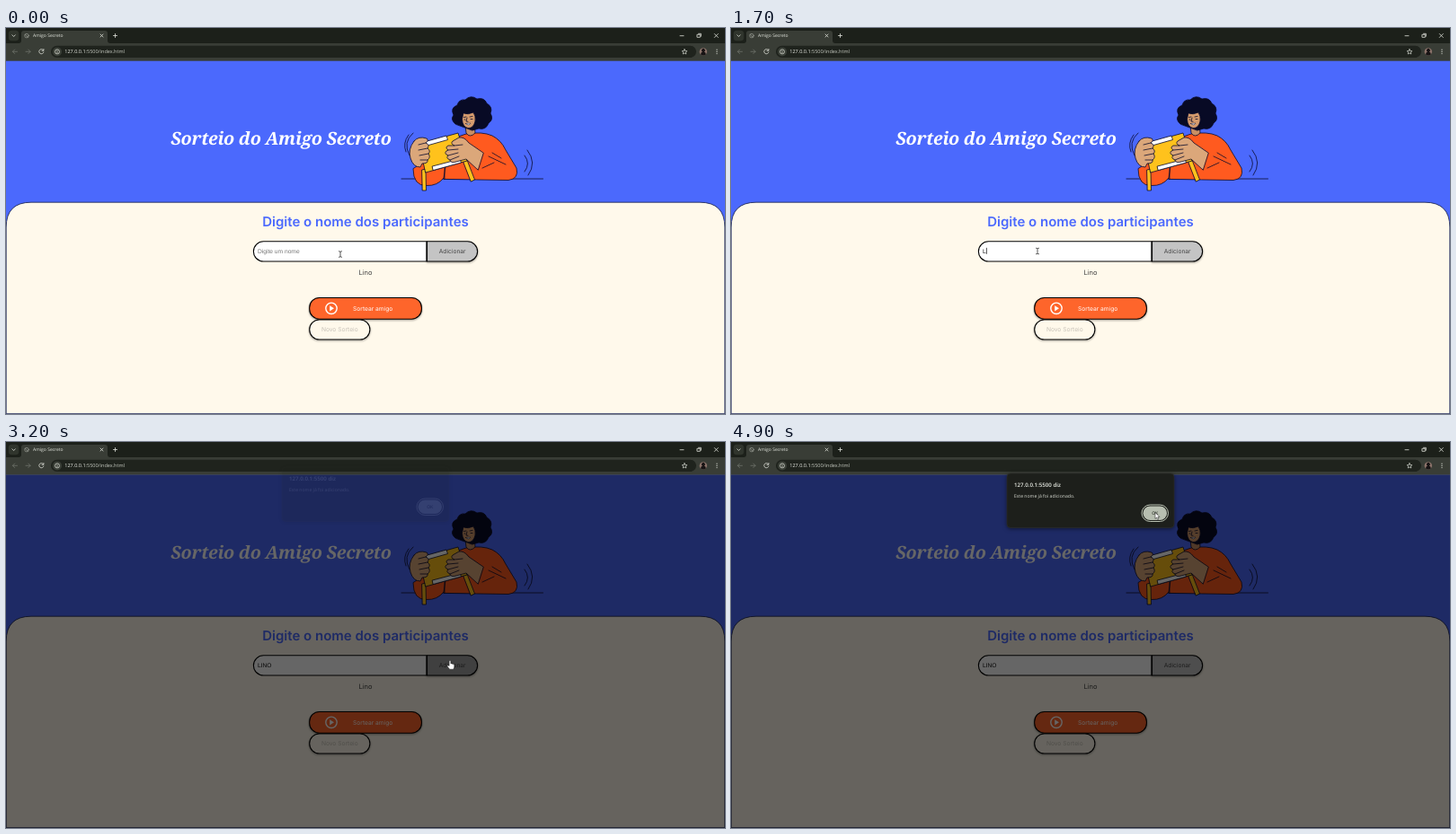
These frames come from a looping animation (800x430 px, 5000 ms). An HTML page:

```html
<!DOCTYPE html>
<html lang="pt-BR">
<head>
<meta charset="utf-8">
<title>Amigo Secreto</title>
<style>
  html, body { margin: 0; width: 100%; height: 100%; overflow: hidden; background: #4b69fd; }
  svg { display: block; width: 800px; height: 430px; text-rendering: geometricPrecision; }
  .ui { font-family: "Open Sans", "Noto Sans", sans-serif; }
  .page { font-family: Inter, Roboto, sans-serif; font-size: 6.67px; }
  .field { font-family: "Liberation Sans", Arial, sans-serif; font-size: 6.67px; }
  .title { font: italic 700 19.8px "Noto Serif", serif; letter-spacing: -.3px; }
  .box { stroke: #000; stroke-width: 1.1; }
  .raised { filter: drop-shadow(0 1.4px 1px rgba(0, 0, 0, .38)); }
  .ink { stroke: #0b0c2c; stroke-width: .8; stroke-linejoin: round; stroke-linecap: round; }
  .line { fill: none; stroke-linecap: round; stroke-linejoin: round; }
</style>
</head>
<body>
<svg viewBox="0 0 800 430" xmlns="http://www.w3.org/2000/svg">
  <!-- page -->
  <g class="page">
    <rect y="36" width="800" height="394" fill="#4b69fd"/>
    <text class="title" x="306" y="130" text-anchor="middle" fill="#fff">Sorteio do Amigo Secreto</text>

    <g class="ink">
      <path class="line" d="M440 168H597.500"/>
      <path class="line" d="M453 117Q441 127 449 142M448 119Q441 128 445 138M577 142Q584 151 577 160M580 136Q591 150 581 164"/>
      <path fill="#ff5a1f" d="M487 168L489 140Q496 121 512 118Q530 115 541 120Q551 125 556 136L568 156Q571 168 559 169.500L524 169Z"/>
      <path fill="#ff5a1f" d="M453 157Q453 176 468 175.500Q480 176 487 167L490 148L464 150Z"/>
      <path class="line" d="M541 139L551 145M537 143L556 152M530 156L543 150M488 150V168"/>
      <path fill="#c98f64" d="M511 108L512 117Q516 123 522 117L521 104Z"/>
      <path fill="#080a25" d="M500 107Q494 102 498 97Q494 89 502 86Q504 79 511 80Q517 74 524 79Q532 77 535 84Q542 88 539 95Q543 102 537 106Q534 114 526 112L519 114Z"/>
      <path fill="#d59b6d" d="M509 95Q514 97 520 94Q523 98 522 104Q520 112 514 111.500Q508 110 507.500 102Z"/>
      <path class="line" d="M509.500 99.500L512 99M516 99L519 98.500M513 100L512 104L514 104.300M511 102H510M517 101.500H519"/>
      <path fill="#fff" stroke-width=".5" d="M511.500 106.500L517 106Q515 109.500 511.500 106.500Z"/>
      <path fill="#ffc21c" d="M463 158L467 157L467.500 181H463.500ZM509 149L513 147L521.500 169L517.500 171Z"/>
      <path fill="#ffc21c" d="M460 129L503 117L513 148L467 161Z"/>
      <path fill="#fff" d="M467 126.500L490 120L491.500 124.500L468.500 131ZM474.500 154L505 146L506.500 150L475.500 158.500Z"/>
      <path fill="#dba77a" d="M454 126Q459 120 468 123Q471 125 467 128Q472 130 469 134Q473 137 470 140Q473 144 469 147Q470 151 463 151L461 155Q453 155 450 145Q447 135 454 126Z"/>
      <path class="line" d="M467 128L459 130M469 134L459 136M470 140L460 142M469 147L461 147"/>
      <path fill="#dba77a" d="M531 139L515 128Q510 121 504 122L497 126Q494 129 499 131L492 131Q488 133 492 136L490 137Q487 140 492 142Q489 145 494 147Q495 151 501 149L512 146L525 158Z"/>
      <path class="line" d="M499 131L508 130M492 136L503 135M492 142L503 139M494 147L504 143"/>
    </g>

    <path fill="#fff9eb" stroke="#182044" stroke-width=".8" d="M.2 429.700V222Q.2 194.200 28 194.200H772Q799.800 194.200 799.800 222V429.700Z"/>
    <text x="400" y="221.200" text-anchor="middle" font-size="15" font-weight="600" fill="#4b69fd">Digite o nome dos participantes</text>

    <path class="box" fill="#fff" d="M468 237.800H286.500A11.100 11.100 0 0 0 286.500 260H468Z"/>
    <text id="hint" class="field" x="280" y="251" fill="#757575">Digite um nome</text>
    <text id="typed" class="field" x="280" y="251" fill="#111"></text>
    <rect id="caret" y="244.800" width=".7" height="7" fill="#000"/>
    <path id="add" class="box raised" d="M468.500 237.800H513.500A11.100 11.100 0 0 1 513.500 260H468.500Z"/>
    <text x="496.700" y="251.400" text-anchor="middle" fill="#444">Adicionar</text>
    <text x="400" y="275.400" text-anchor="middle" font-size="7.500" fill="#444">Lino</text>

    <rect class="box raised" x="337.700" y="300.500" width="124.700" height="23.700" rx="11" fill="#fe652b"/>
    <circle cx="362" cy="312.300" r="6.200" fill="none" stroke="#fff" stroke-width="1.400"/>
    <path fill="#fff" d="M360.200 309.200L365 312.300L360.200 315.400Z"/>
    <text x="408.200" y="314.900" text-anchor="middle" fill="#fff">Sortear amigo</text>
    <rect class="box raised" x="337.700" y="325" width="67.200" height="22" rx="11" fill="#fff9eb"/>
    <text x="371.300" y="338.400" text-anchor="middle" fill="#c7c2b8">Novo Sorteio</text>
  </g>
  <rect id="shade" y="36.500" width="800" height="394" opacity=".6"/>

  <!-- browser bar -->
  <g class="ui">
    <rect width="800" height="18" fill="#1c201a"/>
    <rect y="17" width="800" height="19.700" fill="#393d36"/>
    <rect x="2.800" y="2.800" width="11.500" height="11.500" rx="3.500" fill="#30352d"/>
    <path fill="#393d36" d="M14 17Q17 17 17 14V6Q17 3 20 3H110Q113 3 113 6V14Q113 17 116 17Z"/>
    <text x="30" y="10.400" font-size="5" fill="#e4e7df">Amigo Secreto</text>
    <g class="line" stroke="#e1e4dc" stroke-width=".8">
      <path d="M6.900 7.800L8.600 9.500L10.300 7.800M105 7L108 10M108 7L105 10M119.500 8.500H123.500M121.500 6.500V10.500"/>
      <path d="M750 8.700H754M788.300 6.500L792.300 10.500M792.300 6.500L788.300 10.500M769.300 7.300H772.300V10.300H769.300ZM770.500 6.300H773.300V9.200"/>
      <path d="M41.400 24.500A2.600 2.600 0 1 0 41.900 27M41.900 23.500V25.300H40"/>
      <path stroke="#6f746b" d="M12.500 26.300H7.500M9.700 24L7.400 26.300L9.700 28.600M22 26.300H27M24.800 24L27.100 26.300L24.800 28.600"/>
      <g stroke="#a6aaa1" stroke-width=".6"><circle cx="23" cy="8.600" r="2.300"/><path d="M21.300 7.500Q23.500 8 23 9.500L24.700 10"/></g>
    </g>
    <rect x="50" y="19.800" width="718" height="13.200" rx="6.600" fill="#1f231d"/>
    <circle cx="57" cy="26.400" r="5" fill="#3a3f37"/>
    <circle cx="57" cy="26.400" r="2.500" fill="none" stroke="#e1e4dc" stroke-width=".7"/>
    <path stroke="#e1e4dc" stroke-width=".7" d="M57 26.200V27.800M57 24.900V25.500"/>
    <text x="65.300" y="28.400" font-size="5.500" fill="#eef0ea">127.0.0.1<tspan fill="#c9cdc4">:5500/index.html</tspan></text>
    <path class="line" stroke="#d5d9d0" stroke-width=".7" d="M755 23.600L755.800 25.500L757.900 25.700L756.300 27L756.800 29L755 27.900L753.200 29L753.700 27L752.100 25.700L754.200 25.500Z"/>
    <circle cx="775.800" cy="26.400" r="4.200" fill="#8d746b"/>
    <path fill="#171314" d="M773 29.500Q773 27 775 26.600A1.900 1.900 0 1 1 776.800 26.600Q778.800 27 778.800 29.400Q775.800 31.400 773 29.500Z"/>
    <g fill="#e1e4dc"><circle cx="791" cy="24.200" r=".6"/><circle cx="791" cy="26.400" r=".6"/><circle cx="791" cy="28.600" r=".6"/></g>
  </g>

  <!-- alert -->
  <g id="alert" class="ui">
    <rect x="307" y="34" width="186" height="60.500" rx="4" fill="#1d1f1b" stroke="#2f322d" stroke-width=".6" style="filter:drop-shadow(0 1px 2px rgba(0,0,0,.5))"/>
    <text x="315" y="49.300" font-size="6.150" font-weight="600" fill="#edf0e8">127.0.0.1:5500 diz</text>
    <text x="315" y="61.300" font-size="5.150" fill="#d8dbd2">Este nome já foi adicionado.</text>
    <rect x="457" y="69" width="29.500" height="18.500" rx="9.250" fill="none" stroke="#ccd5c5" stroke-width=".9"/>
    <rect id="ok" x="458.500" y="70.500" width="26.500" height="15.500" rx="7.750"/>
    <text x="471.700" y="80.100" font-size="5" font-weight="600" text-anchor="middle" fill="#343a30">OK</text>
  </g>

  <!-- pointers, each with its hot spot at 0,0 -->
  <g id="beam" class="line" stroke="#222" stroke-width=".75"><path d="M-1.500 -3.300Q0 -3.300 0 -2.600Q0 -3.300 1.500 -3.300M0 -2.600V2.600M-1.500 3.300Q0 3.300 0 2.600Q0 3.300 1.500 3.300"/></g>
  <g id="hand" fill="#fff" stroke="#111" stroke-width=".5" stroke-linejoin="round"><path d="M-.9 .3Q0 -.8 .9 .3V3.400Q1.900 2.800 2.400 3.700Q3.300 3.200 3.700 4.100Q4.800 3.900 4.800 5V7.200Q4.400 8.300 3.900 9.700H-.3L-3 6.400Q-3.200 4.900 -1.900 5.200L-.9 6Z"/></g>
  <g id="arrow" fill="#fff" stroke="#111" stroke-width=".5" stroke-linejoin="round"><path d="M0 0V7L1.600 5.500L2.700 8L3.900 7.500L2.800 5.100H5Z"/></g>
</svg>
<script>
const $ = id => document.getElementById(id);
const el = {};
for (const id of ["hint", "typed", "caret", "add", "shade", "alert", "ok", "beam", "hand", "arrow"]) el[id] = $(id);

const LOOP = 5000, NAME = "LINO";

// [time, pointer, x, y]
const pointer = [
  [0, "beam", 372, 252], [100, "beam", 366, 250], [300, "beam", 360, 249],
  [400, "beam", 355, 249], [600, "beam", 351, 254], [700, "beam", 347, 260],
  [1200, "beam", 341, 248.5], [3000, "beam", 420, 246], [3100, "hand", 494, 243.5],
  [4700, "arrow", 489, 180], [4800, "arrow", 477, 98], [4900, "arrow", 472, 78.5]
];
// [time, opacity, vertical shift]
const alertSteps = [[0, 0, 0], [3200, .13, -6], [3300, .75, -1], [3400, 1, 0], [4900, 1, 1]];
// [time, shown]
const blink = [[0, 0], [700, 1], [1200, 0], [1700, 1], [2500, 0], [3000, 1], [3200, 0]];

const at = (steps, t) => steps.reduce((hit, s) => s[0] <= t ? s : hit);
const show = (node, on) => node.setAttribute("visibility", on ? "visible" : "hidden");

function draw(t) {
  const count = Math.max(0, Math.min(NAME.length, Math.floor((t - 1600) / 100)));
  const text = NAME.slice(0, count);
  if (el.typed.textContent !== text) el.typed.textContent = text;
  show(el.hint, !count);
  el.caret.setAttribute("x", 280.2 + (count ? el.typed.getComputedTextLength() : 0));
  show(el.caret, at(blink, t)[1]);

  const [, kind, x, y] = at(pointer, t);
  for (const k of ["beam", "hand", "arrow"]) show(el[k], k === kind);
  el[kind].setAttribute("transform", `translate(${x} ${y})`);
  el.add.setAttribute("fill", kind === "hand" ? "#a1a1a1" : "#c4c4c4");

  const [, opacity, dy] = at(alertSteps, t);
  show(el.shade, opacity);
  el.alert.setAttribute("opacity", opacity);
  el.alert.setAttribute("transform", `translate(0 ${dy})`);
  el.ok.setAttribute("fill", t >= 4900 ? "#b7beb0" : "#c8d1c1");
}

const start = performance.now();
function tick() {
  draw((performance.now() - start) % LOOP);
  requestAnimationFrame(tick);
}
tick();
</script>
</body>
</html>
```
